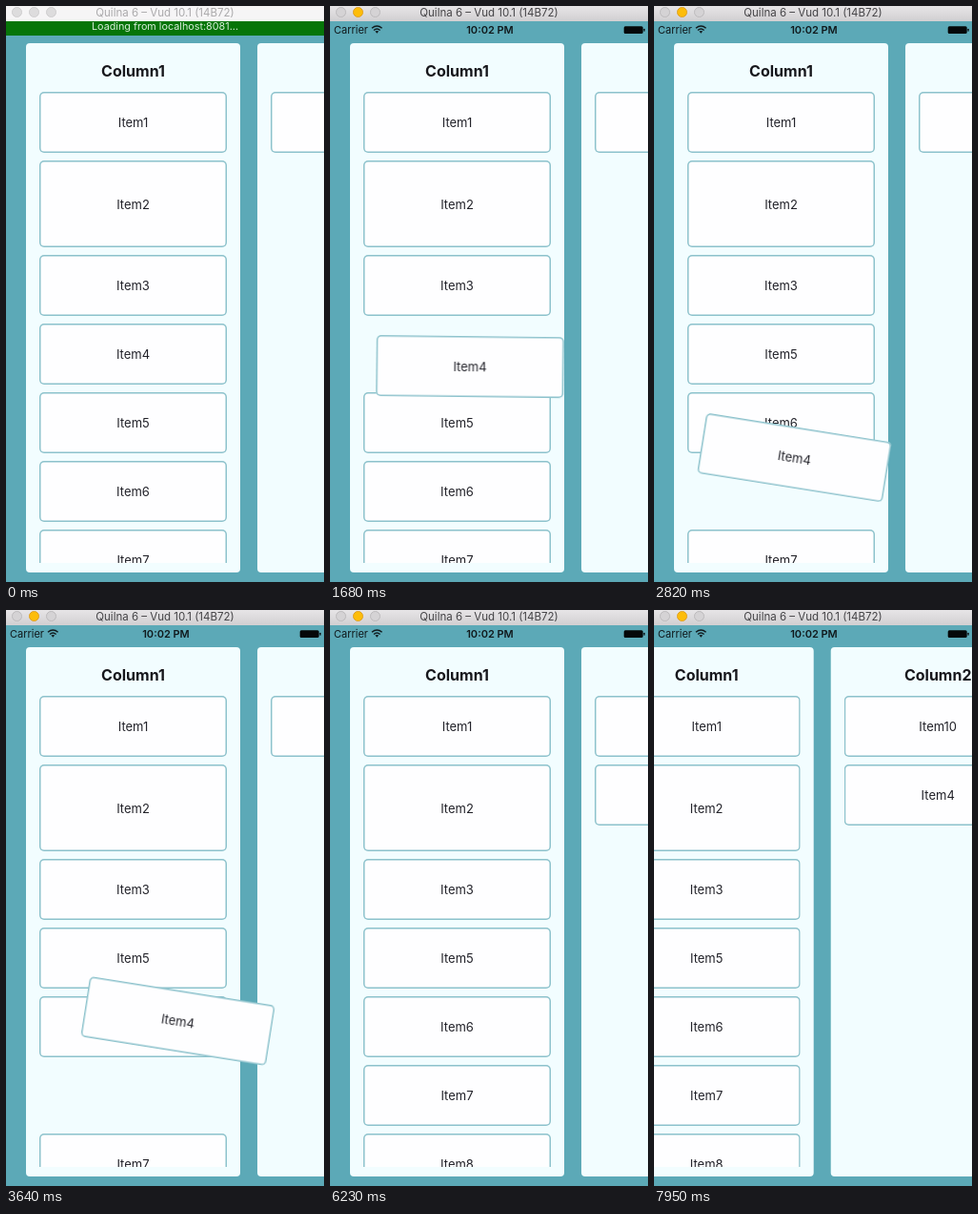
Recreate the animation shown at these times as an HTML page. Size 334x604 px, loop 8000 ms.

```html
<!DOCTYPE html>
<html lang="en">
<head>
<meta charset="utf-8">
<title>Draggable board</title>
<style>
  html, body { margin: 0; width: 100%; height: 100%; overflow: hidden; }
  body { background: #5ca9b7; font-family: Inter, Roboto, sans-serif; color: #23232a; }
  #stage { position: relative; width: 334px; height: 604px; overflow: hidden; }
  #stage div, #stage svg { position: absolute; box-sizing: border-box; }
  .titlebar {
    left: 0; top: 0; width: 334px; height: 16px; text-align: center;
    font-size: 11.5px; line-height: 15px; color: #444346;
    background: linear-gradient(#e7e5e7, #d1cfd1);
  }
  .titlebar.idle { background: #f6f5f6; color: #aaa9ab; }
  .light {
    top: 1px; width: 11px; height: 11px; border-radius: 50%;
    background: #d5d3d5; border: 1px solid #bdbbbd;
  }
  .light.amber { background: #fdbd0a; border-color: #dfa023; }
  .idle .light { background: #dddcdd; border-color: #cfcecf; }
  .status { top: 19px; font-size: 11px; line-height: 13px; color: #10191c; white-space: nowrap; }
  .loading {
    left: 0; top: 16px; width: 334px; height: 15px; background: #067508; color: #d9eeda;
    font-size: 10.8px; line-height: 12px; text-align: center; overflow: hidden;
  }
  #board { left: 0; top: 0; width: 500px; height: 604px; }
  .column { top: 39px; width: 225px; height: 555px; border-radius: 4px; background: #f2fdff; }
  .heading {
    left: 0; top: 18px; width: 225px; text-align: center;
    font-size: 16px; line-height: 22px; font-weight: 700; color: #17171c;
  }
  .list { left: 0; top: 48px; width: 225px; height: 497px; overflow: hidden; }
  .card {
    left: 14px; width: 197px; height: 64px; border-radius: 5px;
    background: #fefeff; box-shadow: inset 0 0 0 1.5px #8cc2cc;
    display: flex; align-items: center; justify-content: center; font-size: 13px;
  }
</style>
</head>
<body>
<div id="stage"></div>
<script>
const LOOP = 8000;
const SWING = 'cubic-bezier(.37, 0, .63, 1)';
const stage = document.getElementById('stage');

function add(parent, className, text = '', style = {}) {
  const el = document.createElement('div');
  el.className = className;
  el.textContent = text;
  Object.assign(el.style, style);
  parent.append(el);
  return el;
}

// Eases from row to row of [time, value] and holds the last value.
function play(el, property, ...rows) {
  const last = rows[rows.length - 1][1];
  const frames = [[0, rows[0][1]], ...rows, [LOOP, last]].map(([time, value]) =>
    ({ offset: time / LOOP, [property]: value, easing: SWING }));
  el.animate(frames, { duration: LOOP, iterations: Infinity });
}

const cut = (el, property, time, before, after) =>
  play(el, property, [time, before], [time, after]);

function column(title, left, names) {
  const el = add(board, 'column', '', { left: left + 'px' });
  add(el, 'heading', title);
  const list = add(el, 'list');
  let top = 3;
  return names.map(name => {
    const height = name === 'Item2' ? 91 : 64;
    const card = add(list, 'card', name, { top: top + 'px', height: height + 'px' });
    top += height + 8;
    return card;
  });
}

const board = add(stage, '');
board.id = 'board';
const items = column('Column1', 21, Array.from({ length: 8 }, (_, i) => 'Item' + (i + 1)));
column('Column2', 264, ['Item10']);

// Item4 leaves its list: two neighbours swap in passing, the rest close up later.
const PICKUP = 1560, LEAVE = 3700, RELEASE = 5350, LANDED = 5500;
items[3].remove();
items.slice(4).forEach((card, i) =>
  cut(card, 'translate', i < 2 ? 2250 + 450 * i : LEAVE, '0 0', '0 -72px'));

const moving = add(board, 'card', 'Item4', { left: '35px', top: '333px' });
play(moving, 'translate',
  [PICKUP, '0 0'], [PICKUP, '13px 13px'], [1650, '13.5px 13px'],
  [3200, '14px 124px'], [4700, '182px -171px'],
  [RELEASE, '190px -172px'], [LANDED, '243px -171px']);
play(moving, 'rotate', [1630, '0deg'], [1930, '9deg'], [RELEASE, '9deg'], [LANDED, '0deg']);

play(board, 'translate', [6400, '0 0'], [6740, '-78.3px 0']);

add(stage, 'status', 'Carrier', { left: '4px' });
add(stage, 'status', '10:02 PM', { left: '118px', width: '100px', textAlign: 'center', fontWeight: 600 });
stage.insertAdjacentHTML('beforeend', `
  <svg width="334" height="15" style="left:0;top:18px" fill="none" stroke="#10191c">
    <path d="M44 5.3Q49.3 .8 54.6 5.3M46 7.5Q49.3 4.6 52.6 7.5" stroke-width="1.5"/>
    <path d="M47.4 8.6Q49.3 7.2 51.2 8.6L49.3 10.8Z" fill="#10191c" stroke="none"/>
    <rect x="308.7" y="3.3" width="20" height="7.7" rx="1.5" fill="#050809" stroke="none"/>
    <rect x="329.4" y="5.7" width="1.3" height="3" rx=".6" fill="#050809" stroke="none"/>
  </svg>`);

const loading = add(stage, 'loading', 'Loading from localhost:8081...');
cut(loading, 'visibility', 450, 'visible', 'hidden');

function titlebar(state) {
  const el = add(stage, 'titlebar ' + state, 'Quilna 6 – Vud 10.1 (14B72)');
  for (let i = 0; i < 3; i++) {
    add(el, i === 1 && !state ? 'light amber' : 'light', '', { left: 6 + 18 * i + 'px' });
  }
  return el;
}
titlebar('');
cut(titlebar('idle'), 'visibility', 1150, 'visible', 'hidden');
</script>
</body>
</html>
```
